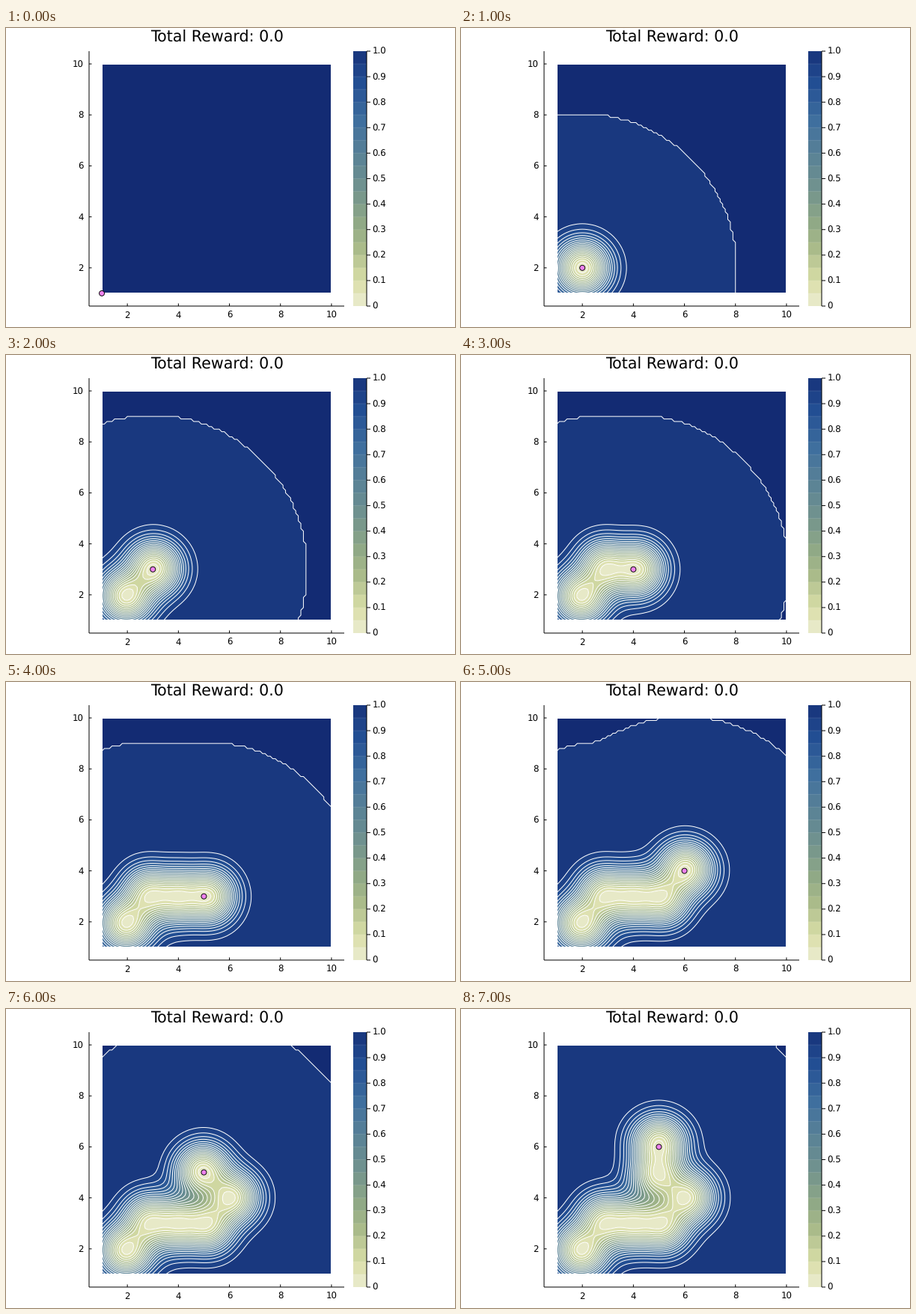
A matplotlib script that plays this animation: 600x400 px, repeating every 8 s.

```python
import numpy as np
import matplotlib.pyplot as plt
from matplotlib.animation import FuncAnimation
from matplotlib.patches import Circle, Rectangle

W, H, DPI = 600, 400, 100
PT = 72 / DPI                       # points per pixel
LEFT, RIGHT, TOP, BOTTOM = 111, 452, 31, 372
UNIT = (RIGHT - LEFT) / 10
BAR_L, BAR_R = 464, 482
PATH = [(1, 1), (2, 2), (3, 3), (4, 3), (5, 3), (6, 4), (5, 5), (5, 6)]
NOISE = 0.01
BANDS = 20

STOPS = {
    0: (231, 233, 199), 1: (222, 225, 177), 2: (207, 215, 161),
    4: (170, 187, 138), 6: (144, 169, 134), 8: (121, 152, 139),
    10: (101, 138, 146), 12: (83, 125, 152), 14: (63, 111, 158),
    17: (34, 78, 147), 19: (25, 56, 127), 20: (19, 43, 115),
}


def band_color(i):
    channels = zip(*STOPS.values())
    return tuple(np.interp(i, list(STOPS), c) / 255 for c in channels)


COLORS = [band_color(i) for i in range(BANDS + 1)]


def px(x):
    return LEFT + (x - 0.5) * UNIT


def py(y):
    return BOTTOM - (y - 0.5) * UNIT


plt.rcParams["font.family"] = "DejaVu Sans"
plt.rcParams["text.hinting"] = "none"
fig = plt.figure(figsize=(W / DPI, H / DPI), dpi=DPI, facecolor="white")
ax = fig.add_axes([0, 0, 1, 1])


def segment(x0, y0, x1, y1, color="black", **style):
    ax.plot([x0, x1], [y0, y1], color=color, lw=PT, zorder=8,
            solid_capstyle="butt", snap=False, **style)


def label(x, y, text, ha, size=11.8):
    ax.text(x, y, text, ha=ha, va="baseline", fontsize=size * PT,
            color="black")


def draw_axes():
    segment(LEFT, TOP, LEFT, BOTTOM)
    segment(LEFT, BOTTOM, RIGHT, BOTTOM)
    for v in range(2, 11, 2):
        segment(px(v), BOTTOM, px(v), BOTTOM - 3.5)
        segment(LEFT, py(v), LEFT + 3.5, py(v))
        label(px(v), 388, str(v), "center")
        label(103.5, py(v) + 4.3, str(v), "right")
    label((LEFT + RIGHT) / 2 + 0.8, 19, "Total Reward: 0.0", "center", 20.6)


def draw_colorbar():
    step = (BOTTOM - TOP) / BANDS
    for i in range(BANDS):
        y = BOTTOM - i * step
        ax.add_patch(Rectangle((BAR_L, TOP), BAR_R - BAR_L, y - TOP,
                               facecolor=COLORS[i], edgecolor="none", lw=0,
                               snap=False))
        if i:
            segment(BAR_L, y, BAR_R, y, "white", alpha=0.12)
    segment(BAR_R, TOP, BAR_R, BOTTOM)
    for i in range(11):
        y = BOTTOM - 2 * i * step
        segment(BAR_R, y, BAR_R + 5, y)
        label(489.5, y + 4.3, f"{i / 10:.1f}" if i else "0", "left")


draw_axes()
draw_colorbar()
field = Rectangle((129, 49), 305, 305, facecolor=COLORS[BANDS],
                  edgecolor="none", lw=0, zorder=1)
ax.add_patch(field)
agent = Circle((0, 0), 3.5, facecolor="#ee82ee", edgecolor="black",
               lw=0.9 * PT, zorder=9)
ax.add_patch(agent)
ax.axis("off")

axis = np.linspace(1, 10, 91)
GX, GY = np.meshgrid(axis, axis)
PX, PY = px(GX), py(GY)
LEVELS = np.arange(1, BANDS) / BANDS


def kernel(ax_, ay, bx, by):
    d2 = (ax_[:, None] - bx[None]) ** 2 + (ay[:, None] - by[None]) ** 2
    return np.exp(-d2 / 2)


def explained(points):
    """Share of the unit prior variance removed by the visited points."""
    x, y = np.array(points, float).T
    k = kernel(x, y, GX.ravel(), GY.ravel())
    cov = kernel(x, y, x, y) + NOISE * np.eye(len(x))
    return (k * np.linalg.solve(cov, k)).sum(axis=0).reshape(GX.shape)


contours = []


def add(draw, z, levels, colors, zorder, **style):
    cs = draw(PX, PY, z, levels=levels, colors=colors, zorder=zorder, **style)
    cs.set_clip_path(field)
    cs.set_snap(False)
    contours.append(cs)


def update(i):
    while contours:
        contours.pop().remove()
    agent.center = px(PATH[i][0]), py(PATH[i][1])
    if i:
        gain = explained(PATH[1:i + 1])
        z = 1 - gain
        # the outer edge lies where the variance rounds to one
        ulps = np.clip(np.rint(gain * 2.0 ** 53) - 2, 0, 50)
        line = dict(linewidths=PT)
        add(ax.contourf, ulps, [1e-3, 100], [COLORS[BANDS - 1]], 2)
        add(ax.contourf, z, [-1, *LEVELS], COLORS[:BANDS - 1], 3)
        add(ax.contour, ulps, [1e-3], "white", 4, **line)
        add(ax.contour, z, LEVELS, "white", 4, linestyles="solid", **line)
    # contouring may autoscale the view
    ax.set_xlim(0, W)
    ax.set_ylim(H, 0)
    return [agent]


anim = FuncAnimation(fig, update, frames=len(PATH), interval=1000,
                     repeat=True, repeat_delay=0, blit=False)
plt.show()
```
